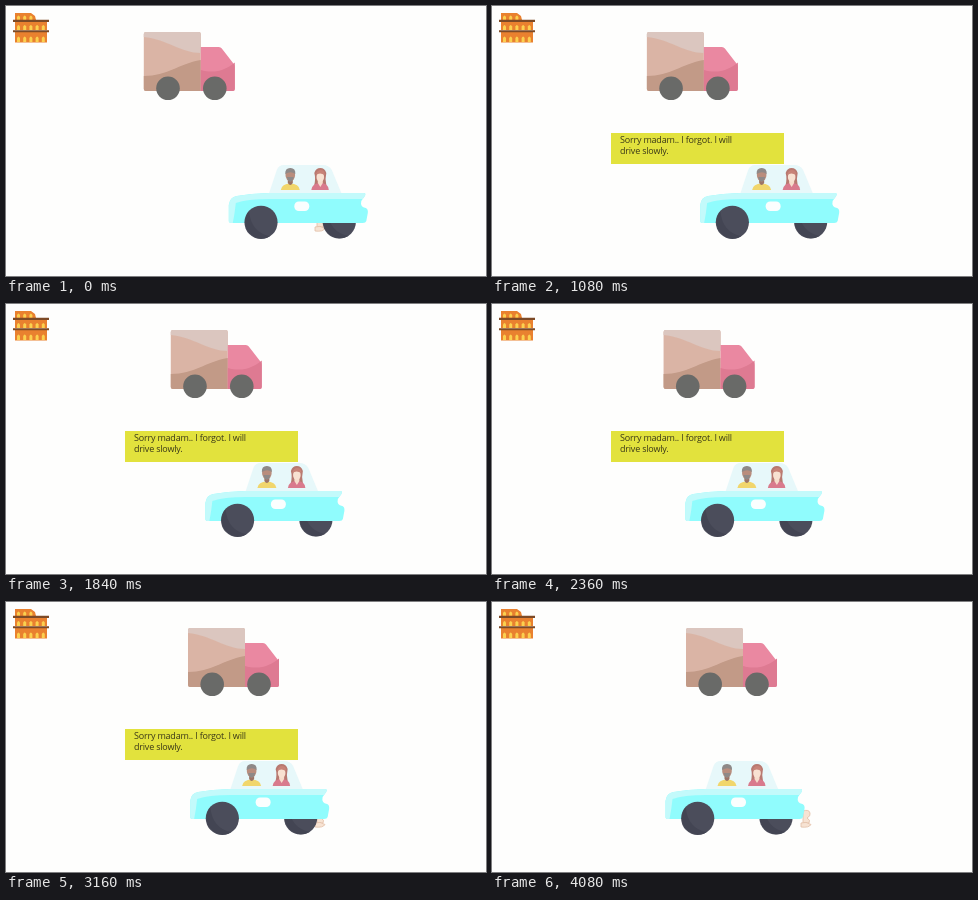
These frames come from a looping animation (480x270 px, 4.12 s). An HTML page:

```html
<!DOCTYPE html>
<html lang="en">
<head>
<meta charset="utf-8">
<style>
html, body { margin: 0; width: 100%; height: 100%; overflow: hidden; background: #fefefd; }
svg { display: block; width: 480px; height: 270px; }
text { font: 500 9px "Open Sans", "Noto Sans", sans-serif; letter-spacing: -.2px; fill: #3a3818; }
</style>
</head>
<body>
<svg viewBox="0 0 480 270">
  <defs>
    <g id="wheel">
      <circle r="16.6" fill="#4b4d5b"/>
      <path d="M-12 -11A16.6 16.6 0 0 0 9 14Q-10 10 -12 -11" fill="#434553"/>
    </g>
  </defs>

  <!-- arena -->
  <g fill="#e9812f">
    <path d="M9 14V7H25L29 10L30 14ZM9 16H41V24H9ZM9 26H41V36.5H9Z"/>
    <path d="M7 13.8H43V16H7ZM7 24.3H43V26.3H7Z" fill="#7d4a26"/>
    <g id="arches" fill="#fbd04f"></g>
  </g>

  <!-- truck -->
  <g id="truck">
    <path d="M2 26H55Q57 26 57 28V85H2Q0 85 0 83V28Q0 26 2 26" fill="#dab4a5"/>
    <path d="M0 31V28Q0 26 2 26H55Q57 26 57 28V47C38 47 22 33 0 31" fill="#dbc6bf"/>
    <path d="M0 70C24 70 34 58 57 54V85H2Q0 85 0 83Z" fill="#c29a87"/>
    <path d="M57 41H75Q77 41 78 42.5L90 58Q91 59 91 61V83Q91 85 89 85H57Z" fill="#ea88a1"/>
    <path d="M57 64C71 68 82 64 91 56.500V83Q91 85 89 85H57Z" fill="#de7a92"/>
    <circle cx="24.200" cy="82.300" r="11.800" fill="#696a68"/>
    <circle cx="71" cy="82.300" r="11.800" fill="#696a68"/>
  </g>

  <!-- dust that the car uncovers -->
  <g fill="#f7e3d3" stroke="#e3bfa8" stroke-width=".8">
    <path d="M311 209Q317 207 318 211Q319 214 315 216Q319 218 317 221H311Z"/>
    <path d="M309 221Q314 219 319 222.500Q317 226 309 225Z"/>
  </g>

  <g id="car">
    <use href="#wheel" x="110.500" y="216"/>
    <path d="M40 188L48 164Q50 159 55 159H94Q100 159 103 164L113 188Z" fill="#e7f8fa"/>
    <!-- driver -->
    <path d="M52 184Q53 177.500 61.500 177.500T71 184Z" fill="#f1d66c"/>
    <path d="M59 173H64V177Q61.500 181 59 177Z" fill="#9c7466"/>
    <ellipse cx="61.500" cy="169" rx="4.800" ry="6.500" fill="#b98d7d"/>
    <path d="M56.500 168Q56 162 61.500 162T66.500 168Q62 164.500 56.500 168M58 171H65Q64 175.500 61.500 175.500T58 171" fill="#8e8988"/>
    <!-- passenger -->
    <path d="M85.500 179Q87 172 85.500 167Q87 162 91.500 162T97.500 167Q96 173 97.500 179Z" fill="#b87970"/>
    <path d="M82.500 184Q83.500 177 91.500 177T100 184Z" fill="#d97a8d"/>
    <path d="M89 173H94V177L91.500 181L89 177Z" fill="#f6dccb"/>
    <ellipse cx="91.500" cy="171" rx="3.800" ry="5" fill="#f8e1d1"/>
    <path d="M87 169Q88 164 92 164T96 169Q91 166 87 169" fill="#c88378"/>
    <!-- body -->
    <path d="M0 215V199Q1 191 8 190Q22 187.500 40 187H135Q137.500 187 136 190L132.500 195Q131 201 137 202Q139.500 203 139 207L137.500 215Q137 217 134 217H3Q0 217 0 215" fill="#90fcfd"/>
    <path d="M0 215V199Q1 191 8 190Q22 187.500 40 187H135Q137.500 187 136 190L134 193H40Q18 193 7 197Q6 207 4 217H3Q0 217 0 215" fill="#c3fafb"/>
    <rect x="65.500" y="195.500" width="15" height="9.500" rx="4.500" fill="#fbfefe"/>
    <use href="#wheel" x="32.200" y="216.300"/>
  </g>

  <g id="speech">
    <path d="M119 127H292V158H119Z" fill="#e2e23d"/>
    <text x="128" y="137">Sorry madam.. I forgot. I will</text>
    <text x="128" y="148">drive slowly.</text>
  </g>
</svg>
<script>
const $ = id => document.getElementById(id);
const LOOP = 4120, STEP = 40;

const arch = (x, y, h) => `<path d="M${x} ${y + h}v${2 - h}q1.5 -3 3 0v${h - 2}z"/>`;
let arches = '';
for (let i = 0; i < 5; i++) {
  const x = 11 + i * 6.2;
  if (i < 3) arches += arch(x, 9, 4.5);
  arches += arch(x, 18.5, 5.5) + arch(x, 30, 6);
}
$('arches').innerHTML = arches;

// Both vehicles start a little faster, then cruise.
const drive = (t, start, cruise, end) => t < 400
  ? start + (cruise - start) * t / 400
  : cruise + (end - cruise) * (t - 400) / 3680;

function draw(now) {
  const t = Math.floor(now % LOOP / STEP) * STEP;
  const place = (id, x) => $(id).setAttribute('transform', `translate(${x.toFixed(2)} 0)`);
  place('truck', drive(t, 137.8, 146, 194));
  place('car', drive(t, 222.8, 216, 173.5));
  $('speech').style.display = t >= 200 && t < 3680 ? '' : 'none';
  requestAnimationFrame(draw);
}
draw(0);
</script>
</body>
</html>
```
